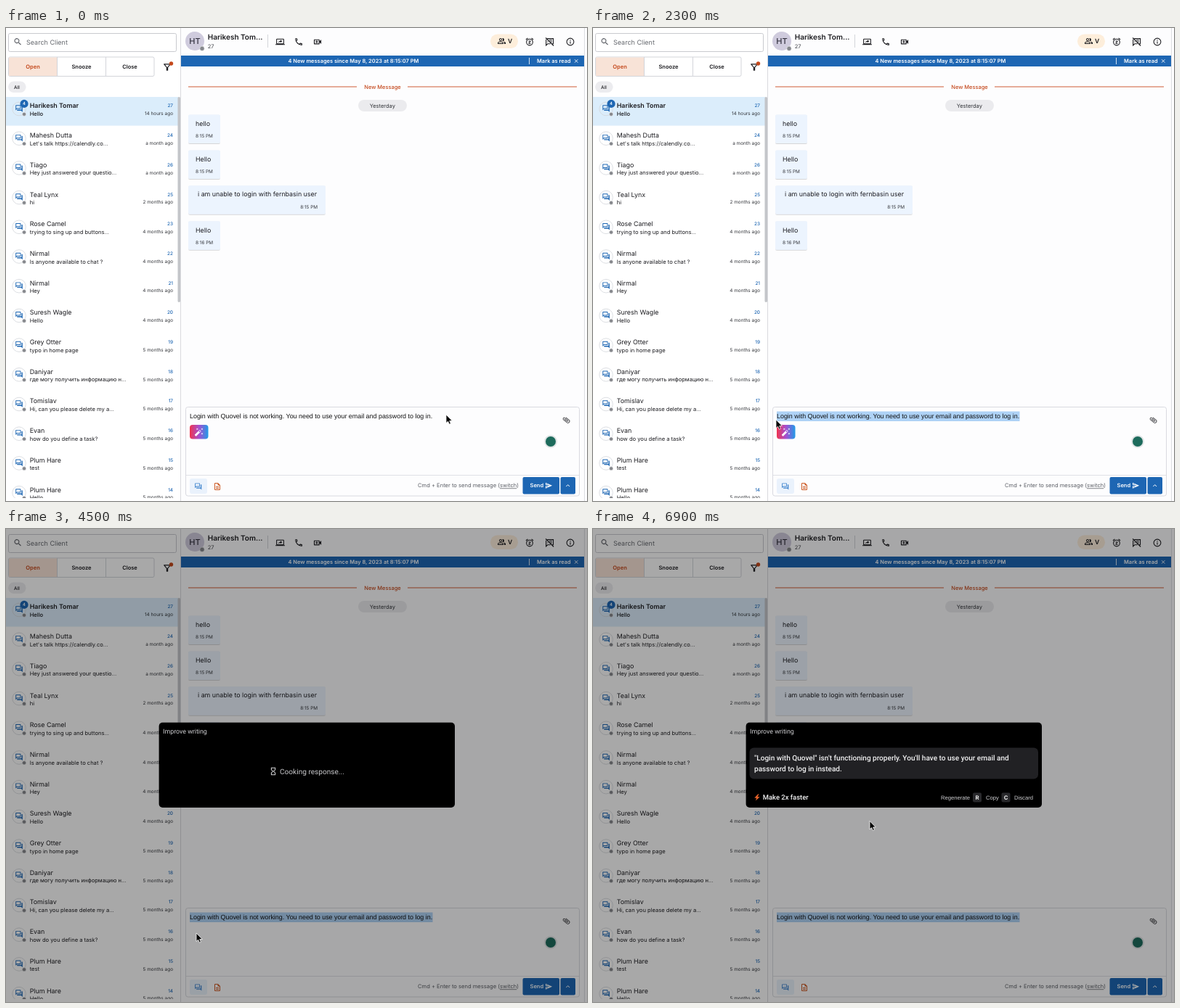
Write an HTML page that moves like this. It is 800 px wide and 652 px high and loops after 7 s.

```html
<!DOCTYPE html>
<html lang="en">
<head>
<meta charset="utf-8">
<title>Support inbox</title>
<style>
  html, body { margin: 0; width: 100%; height: 100%; overflow: hidden; background: #fdfdfe; }
  svg { display: block; }
  text { white-space: pre; text-rendering: geometricPrecision; }
  .ui { font-family: Inter, sans-serif; }
  .ro { font-family: Roboto, sans-serif; }
  .ar { font-family: "Liberation Sans", Arial, sans-serif; }
</style>
</head>
<body>
<svg id="stage" width="800" height="652" viewBox="0 0 800 652"></svg>
<script>
const INK = '#1c1c20', GREY = '#5c5f66', BLUE = '#1d66b3', RUST = '#c4481c';

// 24-unit icon outlines
const ICON = {
  chat: 'M15 4v7H5.2L4 12.2V4h11m1-2H3c-.6 0-1 .4-1 1v14l4-4h10c.6 0 1-.4 1-1V3c0-.6-.4-1-1-1zm5 4h-2v9H6v2c0 .6.4 1 1 1h11l4 4V7c0-.6-.4-1-1-1z',
  search: 'M15.5 14h-.8l-.3-.3A6.5 6.5 0 1 0 13.7 14.4l.3.3v.8l5 5 1.5-1.5zm-6 0a4.5 4.5 0 1 1 0-9 4.5 4.5 0 0 1 0 9z',
  filter: 'M7 6h10l-5 6.3zM4.2 5.6 10 13v6c0 .6.4 1 1 1h2c.6 0 1-.4 1-1v-6l5.7-7.4A1 1 0 0 0 19 4H5c-.8 0-1.3 1-.8 1.6z',
  share: 'M20 18a2 2 0 0 0 2-2V6a2 2 0 0 0-2-2H4a2 2 0 0 0-2 2v10a2 2 0 0 0 2 2H0v2h24v-2zM4 16V6h16v10zm9-6.9c-3.9.6-5.4 3.2-6 5.9 1.4-1.9 3.2-2.7 6-2.7v2.2l4-3.8L13 7z',
  phone: 'M6.5 5c.1.9.2 1.8.5 2.6L5.8 8.8C5.4 7.6 5.1 6.3 5 5h1.5m9.9 12c.9.3 1.7.4 2.6.5V19c-1.3-.1-2.6-.4-3.8-.8L16.4 17M7.5 3H4a1 1 0 0 0-1 1 17 17 0 0 0 17 17 1 1 0 0 0 1-1v-3.5a1 1 0 0 0-1-1c-1.2 0-2.4-.2-3.6-.6a1 1 0 0 0-1 .2l-2.2 2.2a15 15 0 0 1-6.6-6.6l2.2-2.2a1 1 0 0 0 .3-1C8.7 6.4 8.5 5.2 8.5 4a1 1 0 0 0-1-1z',
  video: 'M15 8v8H5V8h10m1-2H4a1 1 0 0 0-1 1v10a1 1 0 0 0 1 1h12a1 1 0 0 0 1-1v-3.5l4 4v-11l-4 4V7a1 1 0 0 0-1-1zM9 9h2v2h2v2h-2v2H9v-2H7v-2h2z',
  people: 'M16.7 13.1c1.3 1 2.3 2.2 2.3 3.9v3h4v-3c0-2.2-3.6-3.5-6.3-3.9zM15 12a4 4 0 1 0-1.3-7.8 6 6 0 0 1 0 7.6c.4.1.8.2 1.3.2zM9 12a4 4 0 1 0 0-8 4 4 0 0 0 0 8zm0-6a2 2 0 1 1 0 4 2 2 0 0 1 0-4zm0 7c-2.7 0-8 1.3-8 4v3h16v-3c0-2.7-5.3-4-8-4zm6 5H3v-1c.2-.7 3.3-2 6-2s5.8 1.3 6 2z',
  snooze: 'M7.9 3.4 6.6 1.9 2 5.7l1.3 1.5zM22 5.7l-4.6-3.8-1.3 1.5 4.6 3.9zM12 4a9 9 0 1 0 0 18 9 9 0 0 0 0-18zm0 16a7 7 0 1 1 0-14 7 7 0 0 1 0 14zM9 11h3.6L9 15.2V17h6v-2h-3.6l3.6-4.2V9H9z',
  info: 'M12 2a10 10 0 1 0 0 20 10 10 0 0 0 0-20zm0 18a8 8 0 1 1 0-16 8 8 0 0 1 0 16zM11 7h2v2h-2zm0 4h2v6h-2z',
  clip: 'M16.5 6v11.5a4 4 0 0 1-8 0V5a2.5 2.5 0 0 1 5 0v10.5a1 1 0 0 1-2 0V6H10v9.5a2.5 2.5 0 0 0 5 0V5a4 4 0 0 0-8 0v12.5a5.5 5.5 0 0 0 11 0V6z',
  doc: 'M8 16h8v2H8zm0-4h8v2H8zm6-10H6a2 2 0 0 0-2 2v16a2 2 0 0 0 2 2h12a2 2 0 0 0 2-2V8zm4 18H6V4h7v5h5z',
  send: 'M4 6l7.5 3.2-7.5-1zm7.5 8.8L4 18v-2.2zM2 3v7l15 2-15 2v7l21-9z',
  glass: 'M6 2v6l4 4-4 4v6h12v-6l-4-4 4-4V2zm10 14.5V20H8v-3.5l4-4zm-4-5-4-4V4h8v3.5z',
  bolt: 'M15 1 3 14h7l-3 9 14-13h-8l5-9z',
  wand: 'M7.5 5.6 10 7 8.6 4.5 10 2 7.5 3.4 5 2l1.4 2.5L5 7zm12 9.8L17 14l1.4 2.5L17 19l2.5-1.4L22 19l-1.4-2.5L22 14zM22 2l-2.5 1.4L17 2l1.4 2.5L17 7l2.5-1.4L22 7l-1.4-2.5zm-7.6 5.3a1 1 0 0 0-1.4 0L1.3 19a1 1 0 0 0 0 1.4l2.3 2.3a1 1 0 0 0 1.4 0L16.7 11a1 1 0 0 0 0-1.4zm-1.1 5.5-2.1-2.1 2.4-2.5 2.2 2.1z'
};

const rect = (x, y, w, h, fill, r = 0, extra = '') =>
  `<rect x="${x}" y="${y}" width="${w}" height="${h}" rx="${r}" fill="${fill}" ${extra}/>`;
const circle = (x, y, r, fill, extra = '') =>
  `<circle cx="${x}" cy="${y}" r="${r}" fill="${fill}" ${extra}/>`;
const line = (d, color, w = 1) => `<path d="${d}" fill="none" stroke="${color}" stroke-width="${w}"/>`;
const text = (s, x, y, size, fill = INK, weight = 400, anchor = 'start', font = 'ui', id = '') =>
  `<text id="${id}" class="${font}" x="${x}" y="${y}" font-size="${size}" fill="${fill}" font-weight="${weight}" text-anchor="${anchor}">${s}</text>`;
const icon = (name, cx, cy, size, fill, turn = 0) =>
  `<path d="${ICON[name]}" fill="${fill}" fill-rule="evenodd" transform="translate(${cx} ${cy}) rotate(${turn}) scale(${size / 24}) translate(-12 -12)"/>`;

const chats = [
  ['Harikesh Tomar', 'Hello', 27, '14 hours'],
  ['Mahesh Dutta', "Let's talk https://calendly.co...", 24, 'a month'],
  ['Tiago', 'Hey just answered your questio...', 26, 'a month'],
  ['Teal Lynx', 'hi', 25, '2 months'],
  ['Rose Camel', 'trying to sing up and buttons...', 23, '4 months'],
  ['Nirmal', 'Is anyone available to chat ?', 22, '4 months'],
  ['Nirmal', 'Hey', 21, '4 months'],
  ['Suresh Wagle', 'Hello', 20, '4 months'],
  ['Grey Otter', 'typo in home page', 19, '5 months'],
  ['Daniyar', 'где могу получить информацию н...', 18, '5 months'],
  ['Tomislav', 'Hi, can you please delete my a...', 17, '5 months'],
  ['Evan', 'how do you define a task?', 16, '5 months'],
  ['Plum Hare', 'test', 15, '5 months'],
  ['Plum Hare', 'Hello', 14, '5 months']
];

function chatRow([name, note, count, age], i) {
  const y = 107 + i * 40.7;
  return (i ? '' : rect(0, 95, 237, 39.6, '#dbedfb')) +
    circle(18, y + 4.5, 9.3, 'none', 'stroke="#d3d6db" stroke-width=".8"') +
    icon('chat', 18, y + 4, 11.5, BLUE) +
    circle(25, y + 11.8, 2.6, '#85878c', 'stroke="#fff" stroke-width=".5"') +
    (i ? '' : circle(25, y - 2.6, 5.6, BLUE) + text('4', 25, y - .6, 5.8, '#fff', 600, 'middle')) +
    text(name, 32.7, y + 3.4, 8.9, INK, i ? 400 : 600) +
    text(note, 32.7, y + 14, 7.58, INK, i ? 400 : 500) +
    text(count, 230, y + 2.4, 6.4, BLUE, 500, 'end') +
    text(age + ' ago', 230, y + 13.2, 6.45, '#33353a', 400, 'end');
}

const sidebar = () =>
  rect(0, 0, 240, 652, '#fff') +
  rect(3.5, 7.5, 231, 25, '#fff', 2, 'stroke="#c9cacf"') +
  icon('search', 16.3, 19, 13, GREY) + text('Search Client', 28, 23, 9, '#66696f') +
  rect(3.5, 40, 200.5, 26.5, '#fff', 2, 'stroke="#d3d5da"') +
  rect(4, 40.5, 66, 25.5, '#f8e3d7') + line('M70.5 40V66.5M137.5 40V66.5', '#d3d5da') +
  text('Open', 37, 55.8, 7.5, RUST, 600, 'middle') +
  text('Snooze', 104, 55.8, 7.5, INK, 600, 'middle') +
  text('Close', 170.5, 55.8, 7.5, INK, 600, 'middle') +
  icon('filter', 222, 54, 14.5, INK) + circle(227.5, 49, 2.7, RUST) +
  rect(3, 73.5, 24.5, 15.5, '#ececef', 7.7) + text('All', 15, 83.6, 6.4, INK, 500, 'middle') +
  `<g clip-path="url(#list)">${chats.map(chatRow).join('')}</g>` +
  rect(236.5, 95, 3.5, 283, '#c3c5c9', 1.7) + line('M240.5 0V652', '#d9dade');

const bubble = (s, y, time, w = 44) =>
  rect(251, y, w, 39.5, '#ecf4fe', 2, 'filter="url(#lift)"') +
  text(s, w > 44 ? 264 : 261, y + 15.2, 8.85) +
  (w > 44 ? text(time, 429, y + 31.8, 6.4, '#33353a', 400, 'end') : text(time, 261, y + 31.8, 6.4, '#33353a'));

const thread = () =>
  circle(260, 18, 13, '#cfcbdd') + text('HT', 260, 22, 11, '#33323f', 500, 'middle') +
  circle(270, 28.3, 3.2, '#85878c', 'stroke="#fff" stroke-width=".6"') +
  text('Harikesh Tom...', 277.7, 16, 10, INK, 600) + text('27', 277.7, 27.8, 7.5, '#44464c') +
  line('M360.5 9V27', '#d3d5da') +
  icon('share', 377.5, 19, 13, INK) + icon('phone', 403, 19, 13, INK) + icon('video', 429, 19, 13.5, INK) +
  rect(667, 8.5, 38, 19.5, '#fdeedb', 9.7) + icon('people', 682.5, 18, 12, INK) + text('V', 694.2, 21.4, 8.5, INK, 600, 'middle') +
  icon('snooze', 721, 19, 13, INK) + icon('info', 777, 19, 13, INK) +
  `<g transform="translate(742 12.4) scale(.55)">${line('M2 2 22 22M6 4H21V17H18M3 6V21L7 17H14M11 8h7M13 12h5M6 12h2', INK, 2)}</g>` +
  rect(241, 38, 555.5, 15, BLUE) +
  text('4 New messages since May 8, 2023 at 8:15:07 PM', 478.5, 48.2, 7.45, '#fff', 600, 'middle') +
  line('M720.5 41V50', '#fff', .8) + text('Mark as read', 731, 48.2, 7.45, '#fff', 600) +
  line('M783 43.3l4.4 4.4m0-4.4-4.4 4.4', '#fff', .9) +
  line('M251 81H483M553 81H786', '#cf5b34', 1) + text('New Message', 518.5, 83.7, 7.45, RUST, 500, 'middle') +
  rect(485, 99, 67, 16, '#ebebee', 8) + text('Yesterday', 518.3, 109.8, 7.5, '#33353a', 400, 'middle') +
  bubble('hello', 119.5, '8:15 PM') + bubble('Hello', 168.5, '8:15 PM') +
  bubble('i am unable to login with fernbasin user', 217.2, '8:15 PM', 189) + bubble('Hello', 266.3, '8:16 PM');

const composer = () =>
  rect(247.5, 522.5, 542, 122.5, '#fdfdfe', 3, 'stroke="#d9dae0"') + line('M248 616.5H789', '#e0e1e6') +
  '<rect id="mark" y="528.5" height="13.5" fill="#aed2f6"/>' +
  text('Login with Quovel is not working. You need to use your email and password to log in.', 253, 538, 8.92, '#111', 400, 'start', 'ar') +
  `<g id="magic">${rect(253, 547, 25.5, 19.5, 'url(#glow)', 4)}${icon('wand', 265.8, 556.8, 13, '#fff')}</g>` +
  icon('clip', 771.5, 540.5, 11.5, INK, -50) +
  circle(750, 570, 8, '#1d6b5c', 'stroke="#e1e5e6" stroke-width="2"') +
  rect(253, 621, 24, 21, '#eaf2fc', 3) + icon('chat', 264.7, 632, 11, '#3f84cd') + icon('doc', 291, 632, 12, '#cc5a24') +
  text('Cmd + Enter to send message (<tspan text-decoration="underline">switch</tspan>)', 706, 633.4, 7.58, GREY, 400, 'end') +
  rect(711.5, 619, 50.5, 23.5, BLUE, 2) + rect(763.5, 619, 20.5, 23.5, BLUE, 2) +
  text('Send', 721.5, 633.2, 7.5, '#fff', 600) + icon('send', 747.3, 630.7, 10.5, '#fff') +
  line('M771.3 632l2.4-2.4 2.4 2.4', '#fff', 1) + line('M796.5 0V652', '#dcdde1');

const keyCap = (s, x) => rect(x, 363.5, 12, 13, '#29292c', 2) + text(s, x + 6, 373, 7.7, '#eee', 700, 'middle');
const modal = () =>
  `<g id="modal">
    <rect id="card" x="210.6" width="407.4" rx="5" fill="#000"/>
    ${text('Improve writing', 216, 0, 8.85, '#cfcfd2', 400, 'start', 'ro', 'title')}
    <g id="wait">${icon('glass', 368, 334, 12.5, '#d2d2d4')}${text('Cooking response...', 377, 338, 10.1, '#c6c6c9', 400, 'start', 'ro')}</g>
    <g id="answer">
      <rect id="field" x="215.5" width="397.5" rx="6" fill="#212124"/>
      ${text('', 222, 0, 10.05, '#f2f2f3', 500, 'start', 'ro', 'first')}
      ${text('', 222, 334, 10.05, '#f2f2f3', 500, 'start', 'ro', 'second')}
      <g id="tools">
        ${icon('bolt', 226, 370, 10, '#f0672c')}${text('Make 2x faster', 233.7, 373.2, 9.45, '#f4f4f5', 500, 'start', 'ro')}
        ${text('Regenerate', 479, 372.8, 7.67, '#cfcfd2', 400, 'start', 'ar')}${keyCap('R', 523)}
        ${text('Copy', 541, 372.8, 7.67, '#cfcfd2', 400, 'start', 'ar')}${keyCap('C', 562.5)}
        ${text('Discard', 580, 372.8, 7.67, '#cfcfd2', 400, 'start', 'ar')}
      </g>
    </g>
  </g>`;

const pointer = `<g id="cursor">
  <circle id="ring" r="16" fill="#fff" fill-opacity=".35" stroke="#0a0a0a" stroke-width="2.4"/>
  <path id="arrow" d="M0 0V11.5L2.6 9.2 4.4 13.2 6.4 12.3 4.7 8.5H8.3Z" fill="#000" stroke="#fff" stroke-width=".8"/>
  <path id="hand" d="M2 7V1.2Q2 0 3 0T4.1 1.2V5Q6-.0 6.2 5.2 8 4.4 8.2 5.8 10 5.2 10.1 6.8V10.5L8.8 13.5H3.2L-.6 8.8Q-.6 7 1 7.6L2 8.6Z" fill="#fff" stroke="#000" stroke-width="1" stroke-linejoin="round"/>
</g>`;

document.getElementById('stage').innerHTML = `<defs>
  <linearGradient id="glow"><stop offset="0" stop-color="#f0344f"/><stop offset=".5" stop-color="#a54fd0"/><stop offset="1" stop-color="#1f9be8"/></linearGradient>
  <clipPath id="list"><rect y="94" width="240" height="554"/></clipPath>
  <filter id="lift"><feDropShadow dx="0" dy=".7" stdDeviation=".6" flood-opacity=".22"/></filter>
  </defs>` + rect(0, 0, 800, 652, '#fdfdfe') + sidebar() + thread() + composer() +
  rect(0, 0, 800, 652, '#000', 0, 'id="dim" opacity=".34"') + modal() + pointer;

const $ = id => document.getElementById(id);
const show = (id, on) => $(id).setAttribute('visibility', on ? 'inherit' : 'hidden');
const set = (id, attrs) => { for (const k in attrs) $(id).setAttribute(k, attrs[k]); };

// pointer stops: time, x, y
const stops = [[0, 606, 533], [900, 606, 536], [1700, 345, 538], [2000, 252, 540], [2300, 252, 540],
  [2800, 266, 550], [3900, 266, 550], [4300, 262, 557], [4600, 262, 557], [5200, 381, 402.5], [7000, 381, 402.5]];
function pointerAt(t) {
  const i = Math.max(1, stops.findIndex(s => s[0] > t));
  const [t0, x0, y0] = stops[i - 1], [t1, x1, y1] = stops[i], k = (t - t0) / (t1 - t0);
  return [x0 + (x1 - x0) * k, y0 + (y1 - y0) * k];
}

const reply = `"Login with Quovel" isn't functioning properly. You'll have to use your email and password to log in instead.`;
const tokens = reply.match(/ ?\w+|\W/g), wrapAt = reply.indexOf('password');
const WAIT = 4500, STREAM = 5300;

function draw(t) {
  const [x, y] = pointerAt(t);
  $('cursor').setAttribute('transform', `translate(${x} ${y})`);
  const hand = t >= 2700 && t < 4300;
  show('hand', hand);
  show('arrow', !hand);
  show('ring', t >= 900 && t < 2100);

  // the selection trails the pointer a little
  const left = t < 900 ? 587.5 : t < 2000 ? Math.min(587.5, Math.max(253, pointerAt(t - 61)[0])) : 253;
  set('mark', { x: left, width: 587.5 - left });
  show('magic', t < 900 || t >= 2200 && t < WAIT);

  const open = t >= WAIT, typing = t >= STREAM;
  show('dim', open);
  show('modal', open);
  show('wait', open && !typing);
  show('answer', open && typing);
  const said = typing ? tokens.slice(0, Math.floor((t - STREAM) / 40) + 1).join('') : '';
  const inset = typing && said.length <= wrapAt ? 8 : 0;
  set('card', { y: 266.8 + inset, height: 117.2 - 2 * inset });
  set('title', { y: 282 + inset * .9 });
  set('field', { y: 301.5 + inset * .9, height: 43 - 2 * inset });
  set('first', { y: 319 + inset * .9 });
  set('tools', { transform: `translate(0 ${-inset})` });
  $('first').textContent = said.slice(0, wrapAt);
  $('second').textContent = said.slice(wrapAt);
}

const start = performance.now();
function tick() {
  const t = (performance.now() - start) % 7000;
  draw(Math.floor(t / 100) * 100);
  requestAnimationFrame(tick);
}
tick();
</script>
</body>
</html>
```
